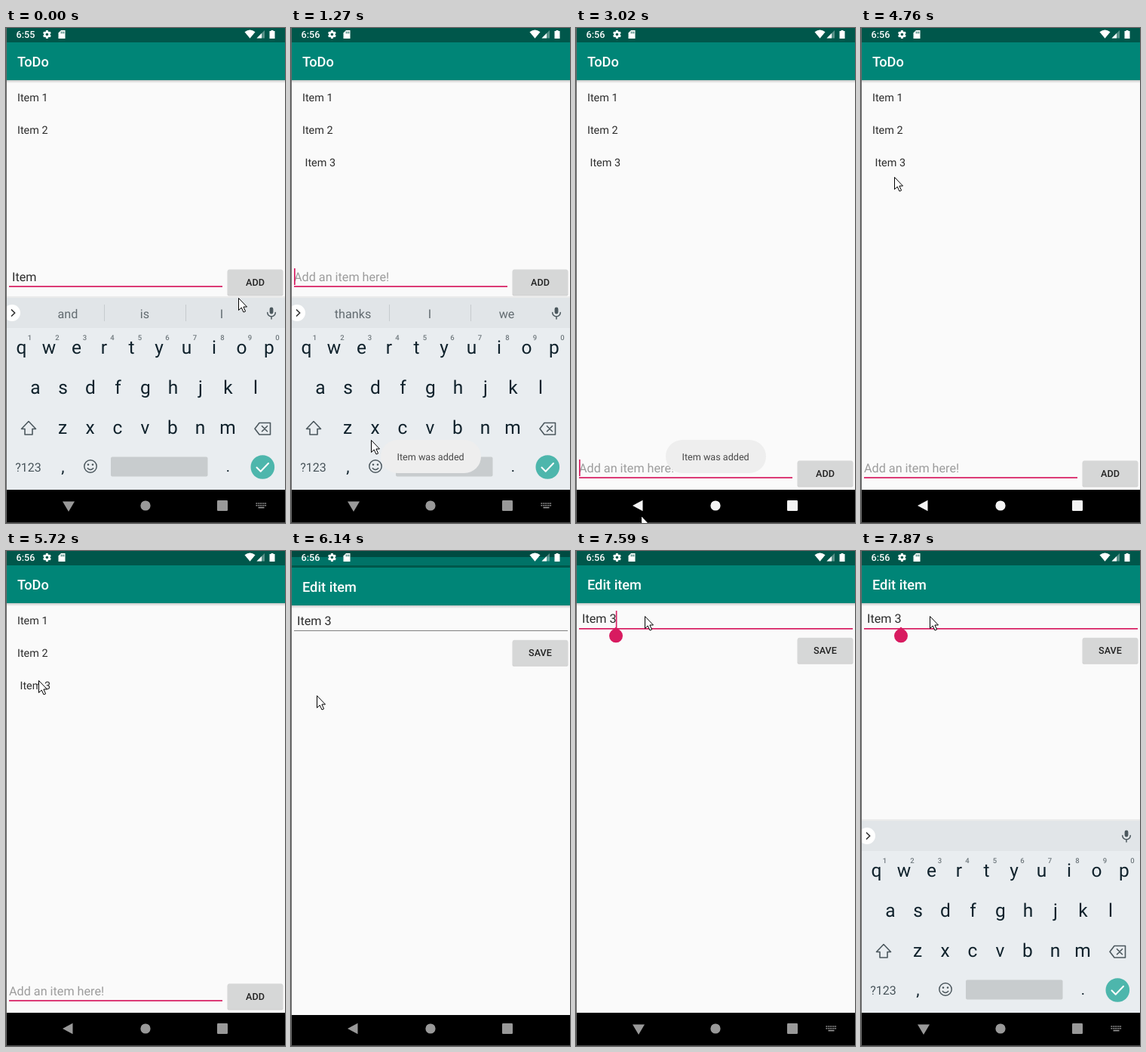
Animation, 370 px wide and 655 px high, one loop 8000 ms. Source, as an HTML page:

```html
<!DOCTYPE html>
<html lang="en">
<head>
<meta charset="utf-8">
<title>ToDo list demo</title>
<style>
html, body { margin: 0; width: 100%; height: 100%; overflow: hidden; background: #000; }
svg { display: block; width: 370px; height: 655px; font-family: Roboto, sans-serif; text-rendering: geometricPrecision; }
text { white-space: pre; }
.med { font-weight: 500; }
.line { fill: none; stroke-linejoin: round; stroke-linecap: round; }
</style>
</head>
<body>
<svg id="stage" viewBox="0 0 370 655"></svg>
<script>
const LOOP = 8000;
const PINK = '#d81b60', INK = '#2c2c2c', KEY = '#10222c', ICON = '#4c585e';

const rect = (x, y, w, h, fill, more = '') =>
  `<rect x="${x}" y="${y}" width="${w}" height="${h}" fill="${fill}" ${more}/>`;
const text = (x, y, size, fill, str, more = '') =>
  `<text x="${x}" y="${y}" font-size="${size}" fill="${fill}" ${more}>${str}</text>`;
const mid = (x, y, size, fill, str, more = '') =>
  text(x, y, size, fill, str, `text-anchor="middle" ${more}`);
const path = (d, more) => `<path d="${d}" ${more}/>`;
const line = (d, color, width = 1.6) =>
  path(d, `class="line" stroke="${color}" stroke-width="${width}"`);

const screen = (title, content) =>
  rect(0, 0, 370, 611, '#fafafa') + rect(0, 611, 370, 44, '#000') +
  rect(0, 69, 370, 4, 'url(#shade)') +
  rect(0, 0, 370, 19, '#00574b') + rect(0, 19, 370, 50, '#008577') +
  text(15, 51, 18.2, '#fff', title, 'class="med"') + content;

const button = (y, label, id) =>
  rect(293.5, y + 1, 74, 34, '#000', 'rx="2" opacity=".16"') +
  rect(294, y, 73, 33.5, '#d6d7d7', `rx="2" id="${id}"`) +
  mid(330.5, y + 21.5, 12.6, '#222', label, 'class="med"');

function todoScreen() {
  const items = [1, 2].map(n => text(15, 53.5 + 43 * n, 14.4, INK, `Item ${n}`)).join('');
  return screen('ToDo', items +
    text(18.5, 182.5, 14.4, INK, 'Item 3', 'id="third"') +
    `<g id="form">${text(8, 335, 16.2, INK, '', 'id="typed"')}
    ${text(4, 335, 16.2, '#9c9c9c', 'Add an item here!', 'id="hint"')}
    ${rect(4, 341.2, 283, 1.7, PINK)}${rect(0, 318, 1.7, 22, PINK, 'id="caret"')}
    ${button(319.5, 'ADD', 'add')}</g>`);
}

function editScreen() {
  return screen('Edit item',
    text(8, 95.3, 16.2, INK, 'Item 3') + rect(4, 102, 363, 1, '#808080', 'id="underline"') +
    rect(52.8, 79, 1.6, 22.5, PINK, 'id="editCaret"') +
    path('M53 100.5L59.5 106A9 9 0 1 1 46.5 106Z', `fill="${PINK}" id="handle"`) +
    button(114.7, 'SAVE', 'save'));
}

function keyRow(letters, x, y) {
  return [...letters].map((c, i) => mid(x + 36.5 * i, y, 24.5, KEY, c)).join('');
}

function keyboard() {
  const digits = [...'1234567890'].map((d, i) =>
    mid(31.5 + 36.5 * i, 413, 9.5, '#70797e', d, 'class="med"')).join('');
  const words = [82, 184, 286].map((x, i) => mid(x, 383.5, 16.2, '#626b70', '', `id="word${i}"`)).join('');
  return rect(0, 355, 370, 2, '#000', 'opacity=".06"') +
    rect(0, 357, 370, 40, '#e1e5e8') + rect(0, 397, 370, 214, '#e9edf0') +
    '<circle cx="8" cy="377" r="11" fill="#fff"/>' + line('M7.5 373L11.7 377L7.5 381', '#333', 1.7) +
    `<g id="words">${words}${rect(130, 366, 1, 22, '#c6cbce')}${rect(238, 366, 1, 22, '#c6cbce')}</g>` +
    rect(349.6, 369.5, 4.8, 9, ICON, 'rx="2.4"') +
    line('M346.7 376.5A5.3 5.3 0 0 0 357.3 376.5M352 382V385', ICON, 1.5) +
    keyRow('qwertyuiop', 20.5, 431) + digits +
    keyRow('asdfghjkl', 39, 483.5) + keyRow('zxcvbnm', 75, 536.5) +
    line('M30 520.5L39.5 530.5H35V538H25V530.5H20.5Z', ICON) +
    line('M336 522.5H350.5V538H336L330 530.2Z', ICON) +
    line('M339.5 526.7L346.5 533.7M346.5 526.7L339.5 533.7', ICON) +
    mid(29.5, 586.5, 16, '#48545a', '?123') + mid(75.5, 588, 22, KEY, ',') +
    `<circle cx="112" cy="580" r="8.2" fill="none" stroke="${ICON}" stroke-width="1.5"/>` +
    `<g fill="${ICON}"><circle cx="109" cy="577.7" r="1.3"/><circle cx="115" cy="577.7" r="1.3"/></g>` +
    line('M108.2 582.5Q112 586.5 115.8 582.5', ICON, 1.4) +
    rect(139, 567.5, 128.5, 26, '#c8ccce', 'rx="2"') + mid(294.5, 587, 20, KEY, '.') +
    '<circle cx="340.3" cy="581" r="15.8" fill="#4db6ac"/>' +
    line('M332.5 581.5L337.7 586.7L348 576', '#fff', 2);
}

function statusIcons() {
  const teeth = [0, 60, 120].map(a =>
    rect(52.9, 3, 3, 11, '#fff', `rx=".6" transform="rotate(${a} 54.4 8.5)"`)).join('');
  return text(13.5, 13, 12.6, '#fff', '', 'id="clock" class="med"') + teeth +
    '<circle cx="54.4" cy="8.5" r="3" fill="none" stroke="#fff" stroke-width="2.4"/>' +
    '<circle cx="54.4" cy="8.5" r="1.8" fill="#00574b"/>' +
    path('M73 3H78.5V14H69.5V6.5Z', 'fill="#fff"') + line('M73.2 5V7M75 5V7M76.8 5V7', '#00574b', .8) +
    path('M316.5 5.2Q323.5 0 330.5 5.2L323.5 13.7Z', 'fill="#fff"') +
    path('M343 3V13.5H332.5Z', 'fill="#fff" opacity=".35"') + path('M339 7V13.5H332.5Z', 'fill="#fff"') +
    path('M351.5 3H354.5V4H356.5V14H349.5V4H351.5Z', 'fill="#fff"');
}

function navIcons() {
  let dots = '';
  for (let r = 0; r < 2; r++)
    for (let c = 0; c < 6; c++) dots += rect(331.5 + 2.4 * c, 628.3 + 2.7 * r, 1.5, 1.6, '#999');
  return `<g id="nav">${path('M75 632L88.5 624.8V639.2Z', 'id="back"')}
    ${path('M75 626.5H91L83 640Z', 'id="down"')}
    <circle cx="185" cy="632" r="6.6"/><rect x="280" y="625" width="14" height="14" rx="1.2"/></g>
    <g id="imeIcon">${dots}${rect(334.5, 633.8, 8, 1.6, '#999')}</g>`;
}

document.getElementById('stage').innerHTML = `
  <defs>
    <linearGradient id="shade" x2="0" y2="1"><stop stop-opacity=".2"/><stop offset="1" stop-opacity="0"/></linearGradient>
    <clipPath id="reveal"><rect id="revealBox" width="370" height="655"/></clipPath>
    <clipPath id="aboveNav"><rect width="370" height="611"/></clipPath>
  </defs>
  <g id="todo">${todoScreen()}</g>
  <g clip-path="url(#reveal)" id="editWrap"><g id="edit">${editScreen()}</g></g>
  <g clip-path="url(#aboveNav)"><g id="keys">${keyboard()}</g></g>
  <g id="toast">${rect(119, 545, 133, 44, '#eee', 'rx="22"')}${text(140.5, 572, 12.6, '#484848', 'Item was added')}</g>
  ${statusIcons()}${navIcons()}
  ${rect(0, 0, 1, 655, '#6a6a6a')}${rect(0, 654, 370, 1, '#4a4a4a')}
  <path id="pointer" d="M.5 .5V16.5L4.2 13L7 19L9.6 17.9L6.9 12H11.5Z" fill="#fff" stroke="#000"/>`;

const el = {};
document.querySelectorAll('[id]').forEach(node => el[node.id] = node);

// Screen updates come in bursts: start, end, number of updates.
const ticks = [0];
for (const [a, b, n] of [[120, 1150, 9], [1270, 1510, 3], [1790, 2480, 6], [2750, 3680, 8],
  [3800, 4760, 8], [4910, 5300, 4], [5580, 5720, 2], [6000, 6660, 6], [6930, 7870, 8]])
  for (let i = 0; i < n; i++) ticks.push(Math.round(a + (b - a) * i / (n - 1)));

const pointerPath = [[0, 308, 357], [250, 308, 357], [510, 322, 337], [760, 322, 337], [1270, 106, 545],
  [1510, 82, 627], [2620, 82, 627], [3016, 86, 645], [3280, 120, 660], [3680, 230, 665], [3800, 269, 619],
  [4200, 160, 390], [4500, 60, 153], [4760, 44, 197], [5300, 43, 173], [5720, 43, 171],
  [6000, 37, 183], [6132, 34, 191], [6660, 34, 191], [7330, 91, 86]];

const clamp = v => Math.max(0, Math.min(1, v));
const ramp = (t, a, b) => clamp((t - a) / (b - a));
const show = (node, on) => node.setAttribute('visibility', on ? 'visible' : 'hidden');
const move = (node, x, y) =>
  node.setAttribute('transform', `translate(${Math.round(x)} ${Math.round(y)})`);

function pointerAt(t) {
  const i = pointerPath.findIndex(p => p[0] > t);
  if (i < 0) return pointerPath.at(-1).slice(1);
  const [a, b] = [pointerPath[i - 1], pointerPath[i]];
  const k = ramp(t, a[0], b[0]);
  return [a[1] + (b[1] - a[1]) * k, a[2] + (b[2] - a[2]) * k];
}

function render(time) {
  const t = ticks.findLast(tick => tick <= time);
  const added = t >= 760, closed = t >= 1900, editing = t >= 6000, focused = t >= 7400;

  el.clock.textContent = t < 890 ? '6:55' : '6:56';
  el.typed.textContent = added ? '' : t < 250 ? 'Item' : 'Item 3';
  show(el.hint, added);
  show(el.third, added);
  el.add.setAttribute('fill', t >= 630 && t < 890 ? '#c6c7c7' : '#d6d7d7');
  move(el.form, 0, closed ? 253 : 0);
  el.caret.setAttribute('x', added ? 4 : t < 250 ? 44.5 : 53);
  show(el.caret, !editing && (added ? (t + 210) % 1000 < 500 : t >= 120));

  const p = t < 6000 ? 0 : t < 6100 ? .3 : t < 6200 ? .89 : 1;
  show(el.editWrap, editing);
  el.revealBox.setAttribute('y', Math.round(655 * (1 - p) ** 1.6));
  move(el.edit, 0, 27 * (1 - p));
  move(el.todo, 0, -12.5 * p);
  el.todo.setAttribute('opacity', editing ? .87 : 1);
  el.underline.setAttribute('fill', focused ? PINK : '#808080');
  el.underline.setAttribute('height', focused ? 1.7 : 1);
  el.editCaret.style.display = focused && t < 7800 ? '' : 'none';
  el.handle.style.display = focused ? '' : 'none';

  const hidden = t < 5000 ? ramp(t, 1740, 2060) : 1 - ramp(t, 7620, 7870);
  move(el.keys, 0, 254 * hidden * hidden);
  show(el.keys, hidden < 1);
  (added ? ['thanks', 'I', 'we'] : ['and', 'is', 'I']).forEach((w, i) => el['word' + i].textContent = w);
  el.words.style.display = editing ? 'none' : '';

  const toast = t < 1150 ? 0 : t < 1270 ? .4 : 1 - ramp(t, 3250, 3650);
  el.toast.setAttribute('opacity', toast);

  const ime = !closed || focused;
  show(el.back, !ime);
  show(el.down, ime);
  show(el.imeIcon, ime);
  el.nav.setAttribute('fill', closed && t < 5150 ? '#f4f4f4' : '#999');
  move(el.pointer, ...pointerAt(t));
}

const start = performance.now();
function loop() {
  render((performance.now() - start) % LOOP);
  requestAnimationFrame(loop);
}
loop();
</script>
</body>
</html>
```
